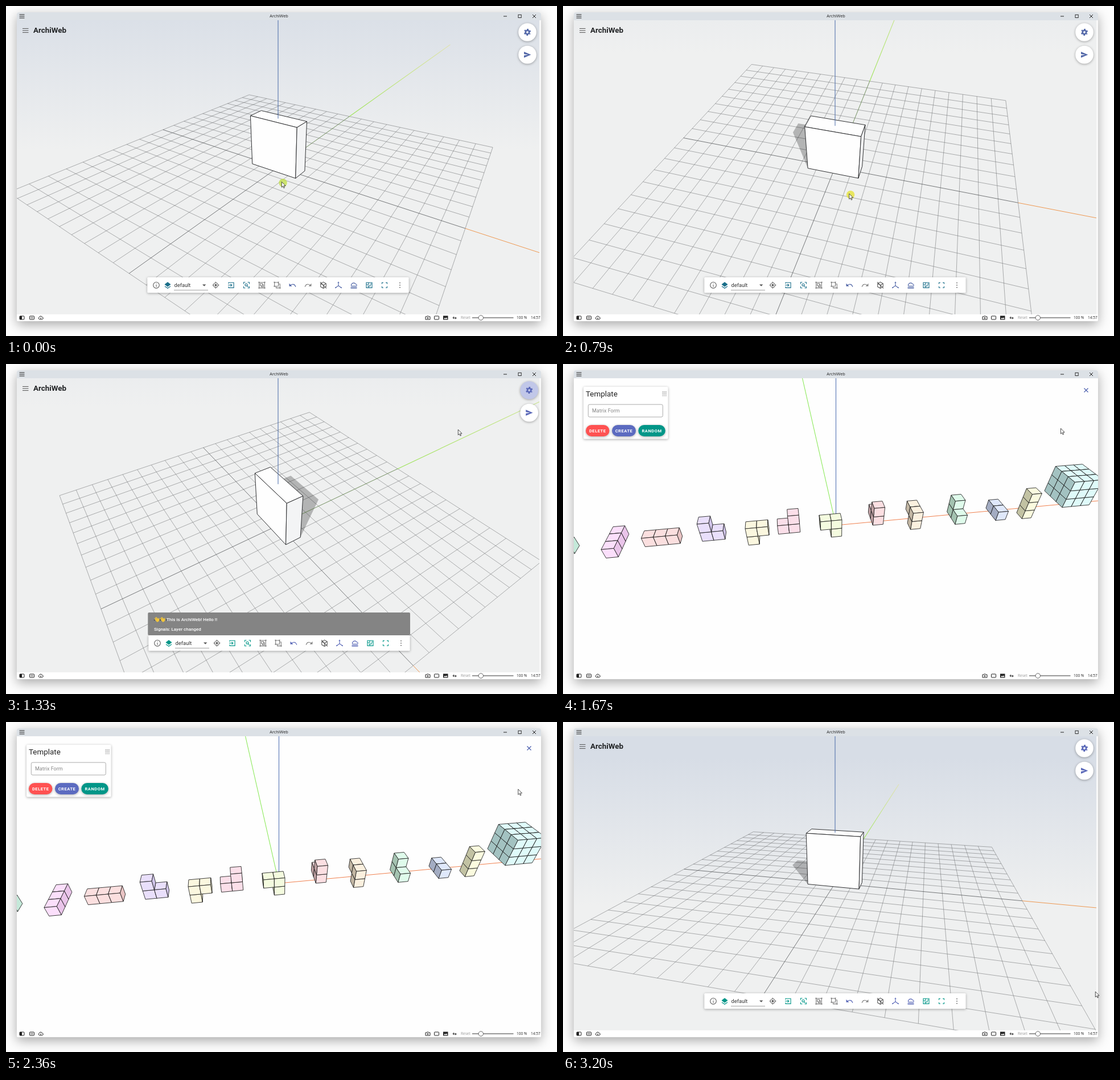
An HTML page that plays this animation: 968x579 px, repeating every 3360 ms.

```html
<!DOCTYPE html>
<html lang="en">
<head>
<meta charset="utf-8">
<title>ArchiWeb</title>
<style>
html, body { margin: 0; width: 100%; height: 100%; overflow: hidden; background: #fdfdfd; }
svg { display: block; width: 968px; height: 579px; font-family: Roboto, sans-serif; }
.ui { --teal: #1b6f8a; --blue: #5267a8; }
.ui.late { --teal: #009688; --blue: #5a68b8; }
.icon { fill: none; stroke-width: 1.1; }
.soft { filter: drop-shadow(0 1px 2px #0005); }
.pill { font-size: 7.6px; font-weight: 700; letter-spacing: .5px; fill: #fff; text-anchor: middle; }
</style>
</head>
<body>
<svg viewBox="0 0 968 579">
  <defs>
    <clipPath id="view"><rect id="viewRect" x="19" y="25" width="918" height="516"/></clipPath>
    <linearGradient id="sky" gradientUnits="userSpaceOnUse" x1="0" x2="0">
      <stop stop-color="#d7dde6"/><stop offset="1" stop-color="#eff0f0"/>
    </linearGradient>
    <linearGradient id="yFade" gradientUnits="userSpaceOnUse">
      <stop stop-color="#9be354"/><stop offset=".5" stop-color="#c5e588"/><stop offset="1" stop-color="#e0e2ae"/>
    </linearGradient>
  </defs>

  <rect x="19" y="11" width="921" height="542" rx="4" fill="#fff" style="filter:drop-shadow(0 6px 10px #0005)"/>
  <path d="M19 25V15Q19 11 23 11H936Q940 11 940 15V25Z" fill="#dce1e6"/>
  <rect x="937" y="25" width="3" height="516" fill="#f9f9f9"/>

  <g clip-path="url(#view)">
    <g id="model">
      <rect x="19" y="25" width="921" height="516" fill="url(#sky)"/>
      <path id="grid" fill="none" stroke="#6d7072" stroke-width=".65" stroke-opacity=".85"/>
      <path id="middle" fill="none" stroke="#4c4f52" stroke-width=".75"/>
      <path id="shadow" fill="#000" fill-opacity=".25"/>
      <path id="xAxis" fill="none" stroke="#ee9851" stroke-width="1"/>
      <path id="yInner" fill="none" stroke="#98e05a" stroke-width=".8" stroke-opacity=".45"/>
      <path id="yAxis" fill="none" stroke="url(#yFade)" stroke-width="1.1"/>
      <g id="box" stroke="#26282a" stroke-width=".95" stroke-linejoin="round"></g>
      <path id="zAxis" fill="none" stroke="#4668a6" stroke-width="1"/>
    </g>
    <g id="pieces" stroke-linejoin="round">
      <rect x="19" y="25" width="921" height="516" fill="#fefefe"/>
    </g>
  </g>

  <g id="ui" class="ui">
    <g id="mainUi">
      <path d="M29 39.5H39.5M29 43H39.5M29 46.5H39.5" stroke="#555" stroke-width="1.1"/>
      <text x="48" y="47.3" font-size="13.4" font-weight="700" fill="#1f2123">ArchiWeb</text>
      <g id="round">
        <circle id="gear" class="soft" cx="916" cy="46" r="15.8"/>
        <circle class="soft" cx="916" cy="85.5" r="15.8" fill="#fff"/>
        <g transform="translate(916 46) rotate(30)" fill="none" stroke="var(--blue)">
          <circle r="3.2" stroke-width="2.6"/>
          <circle r="5.1" stroke-width="2" stroke-dasharray="2.67" stroke-dashoffset="1.3"/>
        </g>
        <path d="M910 80.2L922.3 85.5 910 90.8V86.7L917.5 85.5 910 84.3Z" fill="var(--blue)"/>
      </g>
      <g id="bar">
        <rect class="soft" x="248.3" y="476" width="459.3" height="27.3" rx="1.5" fill="#fff"/>
        <text x="295.5" y="493" font-size="9.3" fill="#333">default</text>
        <path d="M295 498.5H355" stroke="#8a8a8a" stroke-width=".8"/>
        <path d="M345 488.5H351.4L348.2 491.8Z" fill="#555"/>
      </g>
      <g id="toast">
        <rect x="249.3" y="436" width="460.7" height="40" rx="2" fill="#848484"/>
        <g id="hands"></g>
        <g fill="#fff" font-size="8" font-weight="500">
          <text x="282" y="451">This is ArchiWeb! Hello !!</text>
          <text x="260" y="468">Signals: Layer changed</text>
        </g>
      </g>
    </g>
    <g id="panel">
      <rect class="soft" x="36" y="40" width="148.6" height="91.5" rx="2" fill="#fff"/>
      <text x="40" y="57.3" font-size="13.4" fill="#222">Template</text>
      <path d="M174.5 48.5H182M174.5 50.9H182M174.5 53.3H182M174.5 55.7H182" stroke="#777" stroke-width="1.1" stroke-dasharray="1.1 1.1"/>
      <rect x="44.3" y="71" width="131" height="22" rx="2.5" fill="none" stroke="#a0a0a0" stroke-width=".9"/>
      <text x="51" y="85.2" font-size="9" fill="#858585">Matrix Form</text>
      <path d="M915.5 42.5L922.5 49.5M922.5 42.5L915.5 49.5" stroke="#4f62b0" stroke-width="1.3"/>
    </g>
  </g>

  <g id="chrome" fill="#222">
    <path d="M23.5 15H32.5M23.5 18H32.5M23.5 21H32.5M874 18H880M925 15L931 21M931 15L925 21" stroke="#222" stroke-width="1"/>
    <rect x="900" y="15.3" width="5.2" height="5.2" fill="none" stroke="#222" stroke-width=".9"/>
    <text x="479.5" y="20.4" font-size="7.3" text-anchor="middle" font-family="Open Sans, sans-serif">ArchiWeb</text>
    <rect x="19" y="541" width="921" height="12" rx="2" fill="#fff"/>
    <g fill="none" stroke="#222" stroke-width="1">
      <rect x="24" y="544" width="8" height="6" rx="1"/>
      <rect x="41.5" y="544" width="8" height="6" rx="1"/>
      <path d="M44.2 545.5V548.5M46.8 545.5V548.5M58.5 549.5H63.5A1.7 1.7 0 0 0 63.5 546 2.6 2.6 0 0 0 58.5 546 1.8 1.8 0 0 0 58.5 549.5ZM60 548L62 547"/>
      <path d="M737 545H739L740 544H742L743 545H745V550H737Z"/><circle cx="741" cy="547.4" r="1"/>
      <rect x="752.5" y="544" width="8" height="6" rx="1"/>
      <path d="M787 545L785 547 787 549M785 547H788M789 545.5L791 547.5 789 549.5M791 547.5H788"/>
    </g>
    <path d="M24 544H28V550H24ZM768 543.5H776.5V550.5H768Z"/>
    <path d="M769 549.3L771 546.7 772.5 548.3 774 546.3 775.7 549.3Z" fill="#fff"/>
    <path d="M819 547H891.5" stroke="#333" stroke-width="1"/>
    <circle cx="834.3" cy="547" r="4.2" fill="#fff" stroke="#555" stroke-width=".9"/>
    <g font-family="Open Sans, sans-serif" font-size="6.5">
      <text x="799" y="549.4" fill="#999">Reset</text>
      <text x="897" y="549.4">100 %</text>
      <text x="922" y="549.4">14:57</text>
    </g>
  </g>

  <g id="cursor">
    <circle id="halo" cx="2.3" cy="1.8" r="7.2" fill-opacity=".8"/>
    <path d="M0 0V9.6L2.2 7.6 3.7 11 5.2 10.3 3.7 7H6.8Z" fill="#fff" stroke="#222" stroke-width=".8"/>
  </g>
</svg>

<script>
const $ = id => document.getElementById(id);
const set = (id, attrs) => { for (const k in attrs) $(id).setAttribute(k, attrs[k]); };
const show = (id, on) => { $(id).style.display = on ? '' : 'none'; };
const add = (id, markup) => $(id).insertAdjacentHTML('beforeend', markup);

const MID_Y = 283, FOCAL = 623, RAD = Math.PI / 180;

// Orbit camera around the origin, z up; angles in degrees. Gives screen x, y and distance to the eye.
function camera(azimuth, elevation, radius, midX) {
  const ca = Math.cos(azimuth * RAD), sa = Math.sin(azimuth * RAD);
  const ce = Math.cos(elevation * RAD), se = Math.sin(elevation * RAD);
  return ([x, y, z]) => {
    const right = y * ca - x * sa, near = x * ca + y * sa;
    const down = near * se - z * ce, depth = radius - near * ce - z * se;
    return [midX + FOCAL * right / depth, MID_Y + FOCAL * down / depth, Math.hypot(right, down, depth)];
  };
}
const xy = p => p[0].toFixed(2) + ' ' + p[1].toFixed(2);
const trace = (cam, ...points) => 'M' + points.map(p => xy(cam(p))).join('L');

const FACES = {
  top: ['001', '101', '111', '011'],
  front: ['000', '100', '101', '001'],
  right: ['100', '110', '111', '101'],
  left: ['010', '000', '001', '011']
};
const digits = s => [...s].map(Number);

function block(cam, origin, size, color) {
  return Object.entries(FACES).map(([side, corners]) => {
    const pts = corners.map(c => cam(digits(c).map((v, i) => origin[i] + v * size[i])));
    const area = pts.reduce((sum, p, i) => {
      const q = pts[(i + 1) % 4];
      return sum + p[0] * q[1] - q[0] * p[1];
    }, 0);
    return area < 0 ? `<path d="M${pts.map(xy).join('L')}Z" fill="${color(side)}"/>` : '';
  }).join('');
}

function drawModel(azimuth, elevation) {
  const cam = camera(azimuth, elevation, 2.06, 478);
  let lines = '';
  for (let i = -10; i <= 10; i++) {
    const k = i / 10;
    if (i) lines += trace(cam, [k, -1, 0], [k, 1, 0]) + trace(cam, [-1, k, 0], [1, k, 0]);
  }
  const skyAt = angle => MID_Y - FOCAL * Math.tan((angle + elevation) * RAD);
  set('sky', { y1: skyAt(-3), y2: skyAt(-26) });
  set('grid', { d: lines });
  set('middle', { d: trace(cam, [-1, 0, 0], [1, 0, 0]) + trace(cam, [0, -1, 0], [0, 1, 0]) });
  set('shadow', { d: trace(cam, [.15, -.05, 0], [.15, .05, 0], [-.05, .34, 0], [-.35, .34, 0], [-.35, .24, 0], [-.15, -.05, 0]) });
  set('xAxis', { d: trace(cam, [1, 0, 0], [3, 0, 0]) });
  set('yInner', { d: trace(cam, [0, 0, 0], [0, 1, 0]) });
  set('yAxis', { d: trace(cam, [0, 1, 0], [0, 4.8, 0]) });
  const from = cam([0, 1, 0]), to = cam([0, 4.8, 0]);
  set('yFade', { x1: from[0], y1: from[1], x2: to[0], y2: to[1] });
  set('zAxis', { d: trace(cam, [0, 0, .3], [0, 0, 1.5]) });
  $('box').innerHTML = block(cam, [-.15, -.05, 0], [.3, .1, .3], side => side === 'right' ? '#f3f4f5' : '#fefefe');
}

// Each piece: x position, y and z offset in cells, hue, occupied cells.
function buildPieces() {
  const cell = .0297, cam = camera(-98.3, 39.7, 1, 479.5);
  const cube = Array.from({ length: 27 }, (_, i) => `${i % 3}${Math.floor(i / 3) % 3}${Math.floor(i / 9)}`).join(' ');
  const pieces = [
    [-.741, -.5, 0, 155, '000 100'],
    [-.596, -1.5, 0, 300, '000 010 020'],
    [-.509, -.5, 0, 0, '000 100 200'],
    [-.363, -.5, 0, 260, '000 100 001'],
    [-.246, -.5, -1, 52, '000 001 101'],
    [-.161, -.5, 0, 338, '000 100 101'],
    [-.045, -.5, -1, 76, '001 101 100'],
    [.103, -.5, 0, 354, '000 001 010'],
    [.217, -.5, -1, 36, '000 001 011'],
    [.334, -1.5, 0, 145, '000 010 011'],
    [.456, -1.5, 0, 222, '000 010'],
    [.565, -.5, -1, 60, '000 001 002'],
    [.684, -.5, 0, 178, cube]
  ];
  const tones = { top: '78% 93%', front: '78% 93%', right: '45% 84%', left: '20% 70%' };
  const cubes = pieces.flatMap(([x, y, z, hue, cells]) => cells.split(' ').map(c => {
    const [i, j, k] = digits(c);
    const origin = [x + i * cell, (y + j) * cell, (z + k) * cell];
    return { origin, hue, distance: cam(origin.map(v => v + cell / 2))[2] };
  })).sort((a, b) => b.distance - a.distance);
  const axis = (color, ...points) => `<path d="${trace(cam, ...points)}" stroke="${color}" fill="none"/>`;
  add('pieces',
    axis('#f0804e', [0, 0, 0], [1, 0, 0]) + axis('#82e84c', [0, 0, 0], [0, 2, 0]) + axis('#4a6ab0', [0, 0, 0], [0, 0, 1]) +
    '<g stroke="#1d1d1d" stroke-width=".85">' +
    cubes.map(c => block(cam, c.origin, [cell, cell, cell], side => `hsl(${c.hue} ${tones[side]})`)).join('') + '</g>');
}

function buildUi() {
  const grey = '#5c5c5c', pale = '#7c7c7c', teal = 'var(--teal)', blue = 'var(--blue)';
  const corners = 'M-5-2V-5H-2M2-5H5V-2M5 2V5H2M-2 5H-5V2';
  const ring = r => `M${-r} 0A${r} ${r} 0 1 1 ${r} 0A${r} ${r} 0 1 1 ${-r} 0Z`;
  const icons = [
    [264, grey, ring(5.3) + 'M0-.6V3M0-3V-2'],
    [284, teal, 'M-5 2L0 5.5 5 2', 'M-5.5-1.2L0-5.5 5.5-1.2 0 3Z'],
    [368.5, grey, ring(4) + 'M0-6V-4M0 4V6M-6 0H-4M4 0H6', ring(2)],
    [395.5, teal, 'M-4.5-2.5V-4.6H4.6V4.6H-4.5V2.5M-5.5 0H1M-1-2.2L1.3 0-1 2.2'],
    [422.5, teal, corners + 'M-2.5-.5A2 2 0 1 1 1.5-.5A2 2 0 1 1-2.5-.5ZM1 1L3.3 3.3'],
    [449.5, pale, 'M-4.8-4.8H4.8V4.8H-4.8ZM-2.8-2.8H1V1H-2.8ZM1-.8H2.8V2.8H-1V1', 'M-6-6h2v2h-2ZM4-6h2v2h-2ZM4 4h2v2h-2ZM-6 4h2v2h-2Z'],
    [476.5, pale, 'M-4.8-4.8H2V2H-4.8ZM2-2H4.8V4.8H-2V2', 'M-6-6h2v2h-2ZM1-6h2v2h-2ZM4 4h2v2h-2ZM-6 1h2v2h-2Z'],
    [503.5, blue, 'M-4 .5C-1-3 4-2 5.3 3', 'M-6-3V2H-1Z'],
    [530.5, '#888', 'M4 .5C1-3-4-2-5.3 3', 'M6-3V2H1Z'],
    [557.5, grey, 'M0-5.5L4.8-2.8V2.8L0 5.5-4.8 2.8V-2.8ZM-4.8-2.8L0 0 4.8-2.8M0 0V5.5M-5.5-5.5L5.5 5.5'],
    [584, blue, 'M0-5V1L-5 4.5M0 1L5 4.5', 'M-1.7-4L0-6.3 1.7-4ZM-6 5.5L-5.3 3-3.5 5ZM6 5.5L5.3 3 3.5 5Z'],
    [611, blue, 'M-4 1.5A2.3 2.3 0 0 1-3.5-2A3.7 3.7 0 0 1 3-2A2 2 0 0 1 4.5 1.5ZM-5.5 3.4H5.5M-5.5 5.3H5.5'],
    [638, teal, 'M-5-4.6H5V4.6H-5ZM-5-1H-1V-4.6M-1 1V4.6M2-2H5M-3 1.5H2V-1'],
    [665, teal, corners.replace(/5/g, '4.5')],
    [692, grey, '', 'M-.8-4.8h1.6v1.6h-1.6ZM-.8-.8h1.6v1.6h-1.6ZM-.8 3.2h1.6v1.6h-1.6Z']
  ];
  add('bar', icons.map(([x, color, line, fill = '']) =>
    `<g class="icon" transform="translate(${x} 489.8)" style="stroke:${color}"><path d="${line}"/>` +
    `<path d="${fill}" style="fill:${color};stroke:none"/></g>`).join(''));

  add('panel', [['DELETE', 40, 41.5, '#ff5252'], ['CREATE', 86, 42, '#5c6bc0'], ['RANDOM', 132.3, 47.5, '#009688']]
    .map(([label, x, width, color]) =>
      `<rect class="soft" x="${x}" y="107" width="${width}" height="20" rx="10" fill="${color}"/>` +
      `<text class="pill" x="${x + width / 2}" y="119.6">${label}</text>`).join(''));

  add('hands', [265.5, 275.5].map(x =>
    `<g transform="translate(${x} 448.5) rotate(-35)"><rect x="-2.8" y="-1.5" width="5.6" height="5.5" rx="2" fill="#f3c63a"/>` +
    '<path d="M-2.2 0V-3.5M-.5 0V-4.5M1.2 0V-4M2.6 2L4 0" stroke="#f3c63a" stroke-width="1.3" stroke-linecap="round"/>' +
    '<path d="M-4.5-1V-3M4.5 3V4.5" stroke="#333"/></g>').join(''));
}

const LOOP = 3360;
const STEPS = [0, 70, 150, 230, 320, 400, 480, 550, 640, 720, 790, 870, 950, 1020, 1100, 1180, 1260, 1330, 1420, 1500, 1590,
  1670, 1730, 1810, 1890, 1970, 2050, 2140, 2210, 2280, 2360, 2430, 2510, 2590, 2670, 2740, 2820, 2900, 2970, 3050, 3120, 3200];
// time, azimuth, elevation
const ORBIT = [[0, -55.9, 28.8], [480, -56.7, 43.2], [790, -74.4, 43.9], [1180, -34, 44.4], [1590, -34, 44.4],
  [2430, -46, 27], [2740, -50.6, 19.8], [3200, -76.2, 22.4]];
// time, tip x, tip y
const POINTER = [[0, 484.3, 308.5], [480, 495.6, 329.3], [790, 502.8, 329.3], [950, 515, 325], [1180, 917, 46], [1330, 794.3, 115],
  [1590, 917, 46], [1810, 800, 230], [2050, 866, 246], [2280, 880, 200], [2430, 917, 46], [2590, 770, 190], [2740, 744.2, 214.2], [2900, 700, 235], [3200, 935.3, 473]];

function at(keys, t) {
  const i = keys.findIndex(k => k[0] > t);
  if (i < 0) return keys.at(-1).slice(1);
  const a = keys[i - 1], b = keys[i], p = (t - a[0]) / (b[0] - a[0]);
  return a.slice(1).map((v, n) => v + (b[n + 1] - v) * p);
}
const within = (t, from, to) => t >= from && t < to;

function draw(t) {
  const wide = within(t, 1180, 2430), gallery = within(t, 1590, 2430), toast = within(t, 1180, 1590);
  show('model', !gallery);
  show('mainUi', !gallery);
  show('pieces', gallery);
  show('panel', gallery);
  show('toast', toast);
  set('viewRect', { width: gallery ? 921 : 918 });
  set('round', { transform: `translate(${wide ? 3.2 : 0} 0)` });
  set('bar', { transform: `translate(${wide ? 2 : 0} 0)` });
  set('gear', { fill: toast ? '#c1c7e8' : within(t, 2430, 2820) ? '#e9ebf5' : '#fff' });
  $('ui').classList.toggle('late', t >= 1180);
  if (!gallery) drawModel(...at(ORBIT, t));
  set('cursor', { transform: `translate(${at(POINTER, t)})` });
  show('halo', t < 950 || within(t, 1810, 2280) || within(t, 2590, 2900));
  set('halo', { fill: t < 70 ? '#c3e04e' : t > 2500 ? '#eed84a' : '#e6e43c' });
}

buildPieces();
buildUi();
const start = performance.now();
let last = -1;
function tick() {
  const t = (performance.now() - start) % LOOP;
  const step = STEPS.findLast(s => s <= t) ?? 0;
  if (step !== last) draw(last = step);
  requestAnimationFrame(tick);
}
tick();
</script>
</body>
</html>
```
